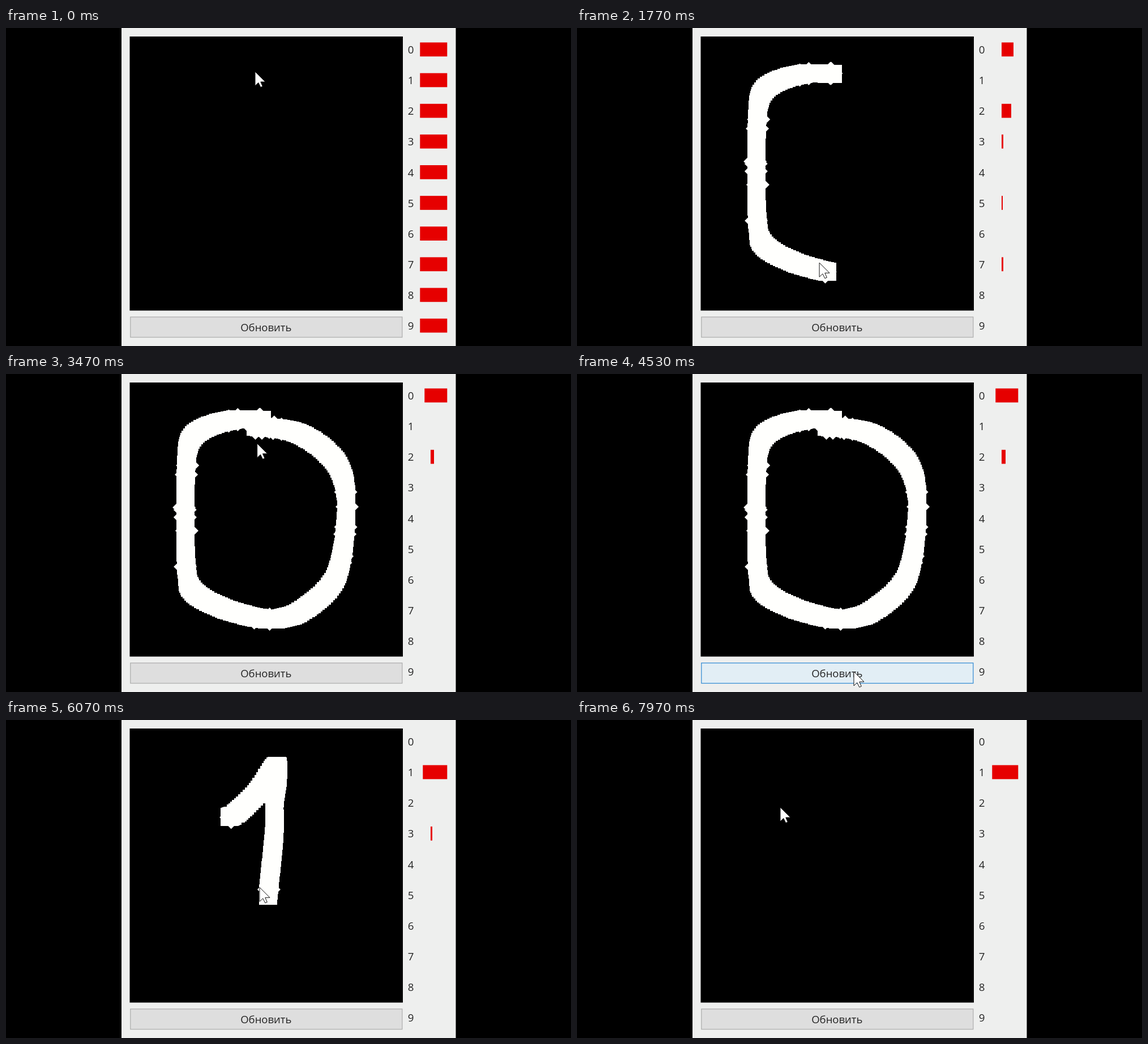
An HTML page for the animation above (8 s loop, 998 by 561 pixels).

```html
<!DOCTYPE html>
<html lang="ru">
<head>
<meta charset="utf-8">
<title>Распознавание цифр</title>
<style>
  html, body { margin: 0; width: 100%; height: 100%; overflow: hidden; background: #000; }
  svg { display: block; width: 100%; height: 100%; }
  text { font-family: "Open Sans", "Noto Sans", sans-serif; fill: #242424; text-anchor: middle; }
</style>
</head>
<body>
<svg viewBox="0 0 998 561">
  <rect width="998" height="561"/>
  <rect x="204" width="590.5" height="561" fill="#eeefee"/>
  <rect x="218.5" y="15" width="482.5" height="483.5"/>
  <path id="ink" fill="#fffffd"/>
  <rect id="button" x="219.8" y="509.8" width="480" height="35.8" stroke-width="1.3"/>
  <text x="459.3" y="535" font-size="18.5">Обновить</text>
  <g id="scale"></g>
  <path id="cursor" d="M0 0V25L5.8 19.5 9.8 27.5 13.3 26 9.8 18H18Z" fill="#fff" stroke="#111"/>
</svg>
<script>
const LOOP = 8000, SIDE = 32, STEP = 5, BUMP_RATE = 0.15;
const byId = id => document.getElementById(id);
const ink = byId('ink'), button = byId('button'), cursor = byId('cursor');

const mix = (a, b, k) => a + (b - a) * k;
const linear = k => k;
const smooth = k => k * k * (3 - 2 * k);

// Finds the keys around t and hands them, with the progress, to blend.
function between(keys, t, ease, blend) {
  const i = keys.findIndex(key => key[0] > t);
  const b = keys[i < 0 ? keys.length - 1 : i];
  const a = i > 0 ? keys[i - 1] : b;
  return blend(a, b, a === b ? 0 : ease((t - a[0]) / (b[0] - a[0])));
}

function seeded(seed) {
  return () => (seed = (seed * 16807) % 2147483647) / 2147483647;
}

function spline(a, b, c, d, u) {
  return b + 0.5 * u * (c - a + u * (2 * a - 5 * b + 4 * c - d + u * (3 * (b - c) + d - a)));
}

const square = (x, y) =>
  `M${Math.round(x) - SIDE / 2} ${Math.round(y) - SIDE / 2}h${SIDE}v${SIDE}h${-SIDE}z`;
const diamond = (x, y, r) => `M${x - r} ${y}l${r} ${-r} ${r} ${r} ${-r} ${r}z`;

// A square nib stamped along a smooth line, turned now and then so that its corners stick out.
// pace holds [time, point index].
function makeStroke({ points, pace, clear, seed }) {
  const random = seeded(seed), wobble = () => (random() - 0.5) * 5;
  const shapes = [square(...points[0])], marks = [0];
  for (let i = 0; i < points.length - 1; i++) {
    const p = points[i], q = points[i + 1];
    const before = points[i - 1] || p, after = points[i + 2] || q;
    const n = Math.ceil(Math.hypot(q[0] - p[0], q[1] - p[1]) / STEP);
    for (let j = 1; j <= n; j++) {
      const [x, y] = [0, 1].map(c => spline(before[c], p[c], q[c], after[c], j / n));
      const bump = random() < BUMP_RATE ? diamond(x + wobble(), y + wobble(), SIDE * 0.64) : '';
      shapes.push(square(x, y) + bump);
    }
    marks.push(shapes.length - 1);
  }
  const keys = pace.map(([t, i]) => [t, marks[i]]);
  const spot = k => {
    const i = marks.findIndex(m => m > k);
    if (i < 0) return points[points.length - 1];
    const u = (k - marks[i - 1]) / (marks[i] - marks[i - 1]);
    return points[i].map((v, c) => mix(points[i - 1][c], v, u));
  };
  const head = t => between(keys, t, linear, (a, b, k) => mix(a[1], b[1], k));
  return {
    start: keys[0][0],
    end: keys[keys.length - 1][0],
    path: t => t < keys[0][0] || t >= clear ? '' : shapes.slice(0, Math.floor(head(t)) + 1).join(''),
    tip: t => spot(head(t)).map(v => v - SIDE / 2 + 1)
  };
}

const strokes = [
  makeStroke({
    points: [[452, 81], [400, 81], [352, 95], [324, 120], [318, 171], [317, 250],
      [319, 345], [331, 384], [385, 414], [450, 431], [486, 431], [530, 413],
      [583, 357], [601, 250], [593, 176], [559, 131], [506, 101], [441, 93]],
    pace: [[640, 0], [1030, 3], [2430, 14], [2950, 17]],
    clear: 4700, seed: 11
  }),
  makeStroke({
    points: [[395, 171], [406, 165], [442, 131], [479, 81], [474, 148], [474, 197],
      [463, 310], [458, 393]],
    pace: [[5100, 0], [6070, 6], [6350, 7]],
    clear: 7550, seed: 5
  })
];

// Where the pointer rests or turns while no stroke is drawn.
const stops = [
  [350, 440, 77], [640, 437, 66],
  [2950, 426, 78], [3330, 440, 90], [4170, 489, 525], [4730, 489, 525], [5060, 380, 156],
  [6350, 443, 378], [6930, 470, 500], [7070, 470, 500], [7300, 454, 525],
  [7580, 454, 525], [7750, 472, 508], [7870, 472, 508], [7970, 359, 154]
];

// Bar width per digit; digits left out are at zero.
const guesses = [
  [1030, { 1: 3, 2: 30, 3: 6, 5: 4, 7: 6 }],
  [2430, { 0: 40, 2: 6 }],
  [5100, { 0: 40, 2: 7 }],
  [5130, { 1: 16, 2: 8, 3: 10, 5: 6, 7: 6 }],
  [6070, { 1: 43, 3: 3 }],
  [6350, { 1: 46 }]
];

function add(tag, attrs, label = '') {
  const el = document.createElementNS('http://www.w3.org/2000/svg', tag);
  for (const name in attrs) el.setAttribute(name, attrs[name]);
  el.textContent = label;
  return byId('scale').appendChild(el);
}

const bars = Array.from({ length: 10 }, (_, i) => {
  add('text', { x: 715.2, y: 45 + 54.14 * i, 'font-size': 18.7 }, i);
  return add('rect', { y: 25.5 + 54.13 * i, height: 24.7, fill: '#e60000' });
});

function barWidth(digit, t) {
  if (t < strokes[0].start) return 48;
  const w = between(guesses, t, linear, (a, b, k) => mix(a[1][digit] || 0, b[1][digit] || 0, k));
  return w < 1.5 ? 0 : Math.round(w);
}

function draw(t) {
  ink.setAttribute('d', strokes.map(s => s.path(t)).join(''));

  const active = strokes.find(s => t >= s.start && t < s.end);
  const [x, y] = active ? active.tip(t) : between(stops, t, smooth,
    (a, b, k) => [mix(a[1], b[1], k), mix(a[2], b[2], k)]);
  cursor.setAttribute('transform', `translate(${x} ${y})`);

  const hover = y >= 510 && y <= 546;
  button.setAttribute('fill', hover ? '#e2eef5' : '#dedede');
  button.setAttribute('stroke', hover ? '#3a8fd4' : '#b0b0b0');

  bars.forEach((bar, i) => {
    const w = barWidth(i, t);
    bar.setAttribute('x', Math.min(750, 779.3 - w));
    bar.setAttribute('width', w);
  });
}

const origin = performance.now();
function tick() {
  draw((performance.now() - origin) % LOOP);
  requestAnimationFrame(tick);
}
tick();
</script>
</body>
</html>
```
